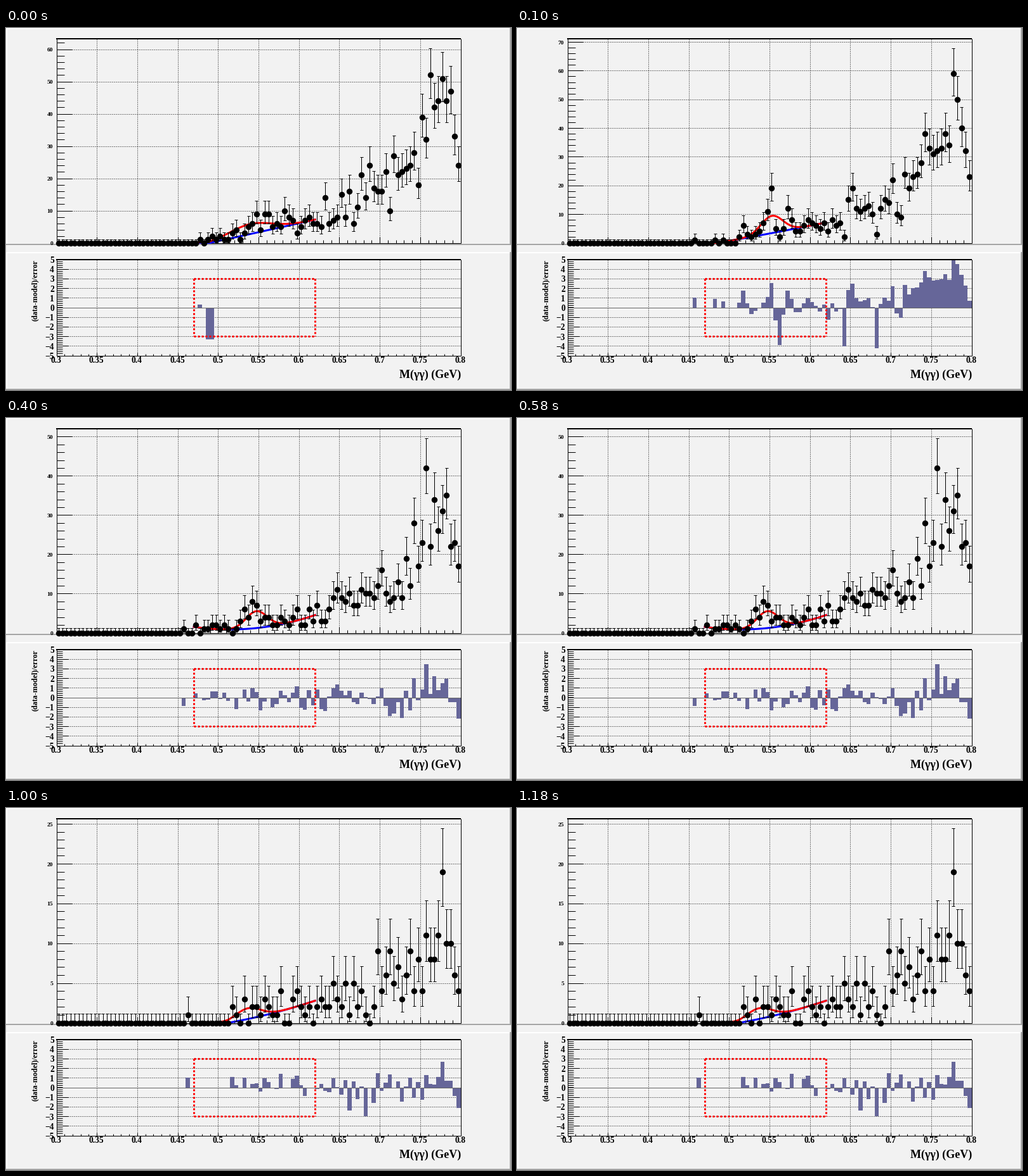
Animation of 796 by 572 pixels, one loop 1300 ms. Source, as a matplotlib script:

```python
import numpy as np
import matplotlib.pyplot as plt
from matplotlib.animation import FuncAnimation
from matplotlib.collections import LineCollection
from matplotlib.patches import Rectangle

W, H = 796, 572
PT = 0.72                       # points per pixel at 100 dpi
LEFT, RIGHT = 79.5, 716.5
TOP, BASE = 17, 339.5           # spectrum frame
PTOP, PBASE = 365.5, 517.5      # pull frame
ZERO = (PTOP + PBASE) / 2
UNIT = (PBASE - PTOP) / 10
BINS = 100
BW = (RIGHT - LEFT) / BINS
CENTERS = LEFT + BW * (np.arange(BINS) + 0.5)
FIT = (0.47, 0.62)
BG, BAR = "#f2f2f2", "#666699"

fig = plt.figure(figsize=(W / 100, H / 100), dpi=100, facecolor=BG)
ax = fig.add_axes([0, 0, 1, 1])
ax.set_xlim(0, W)
ax.set_ylim(H, 0)
ax.axis("off")


def px(mass):
    return LEFT + (np.asarray(mass) - 0.3) / 0.5 * (RIGHT - LEFT)


def segments(segs, color="black", width=1, style="solid", z=2):
    return ax.add_collection(LineCollection(
        segs, colors=color, linewidths=width * PT, linestyles=[style],
        zorder=z, capstyle="butt"))


def hline(y, x0=LEFT, x1=RIGHT):
    return [(x0, y), (x1, y)]


def vline(x, y0, y1):
    return [(x, y0), (x, y1)]


def grid(segs):
    return segments(segs, style=(0, (1, 2)), z=1)


def label(x, y, s, size, **kw):
    kw = {"ha": "right", "va": "center_baseline", **kw}
    return ax.text(x, y, s, fontsize=size * PT, family=["Liberation Serif", "DejaVu Serif"],
                   weight="bold", zorder=9, **kw)


def bevel(y0, y1):
    for x, y, w, h, c in [(0, y0, W, 2, "white"), (0, y0, 2, y1 - y0, "white"),
                          (0, y1 - 2, W, 2, "#a6a6a6"),
                          (W - 2, y0, 2, y1 - y0, "#a6a6a6")]:
        ax.add_patch(Rectangle((x, y), w, h, fc=c, lw=0, zorder=0.5))


def frame(y0, y1):
    segments([hline(y1), vline(LEFT, y0, y1), vline(RIGHT, y0, y1)], z=4)
    segments([hline(y0, LEFT - 0.5, RIGHT + 0.5)], width=2, z=4)
    major = px(np.arange(0.35, 0.79, 0.05))
    grid([vline(x, y1, y0) for x in major])
    tick = 0.03 * (y1 - y0)
    segments([vline(x, y1, y1 - tick) for x in major])
    segments([vline(x, y1, y1 - tick / 2) for x in px(np.arange(0.31, 0.795, 0.01))])


def draw_static():
    bevel(0, 343)
    bevel(354, H)
    frame(TOP, BASE)
    frame(PTOP, PBASE)
    levels = range(-5, 6)
    ys = [ZERO - v * UNIT for v in levels]
    grid([hline(y) for y in ys[1:-1]])
    segments([hline(y, LEFT, LEFT + 18) for y in ys])
    segments([hline(ZERO - v * UNIT, LEFT, LEFT + 9) for v in np.arange(-5, 5.1, 0.2)])
    for v, y in zip(levels, ys):
        label(76, y + 0.5, str(v).replace("-", "\u2212"), 13.5)
    for m in np.arange(0.3, 0.81, 0.05):
        label(px(m) - 0.5, 529, f"{m:.2f}".rstrip("0"), 13.5, ha="center", va="baseline")
    label(717, 553, "M(\u03b3\u03b3) (GeV)", 18, va="baseline")
    label(52, 366, "(data-model)/error", 12, rotation=90, va="top",
          rotation_mode="default")
    segments([hline(ZERO)], color="#666666", z=3.5)
    x0, x1 = px(FIT)
    y0, y1 = ZERO - 3 * UNIT, ZERO + 3 * UNIT
    segments([hline(y0, x0, x1), hline(y1, x0, x1), vline(x0, y0, y1), vline(x1, y0, y1)],
             color="red", width=3, style=(0, (1, 1)), z=5)


def poisson_errors(n):
    """Central 68% interval (Wilson-Hilferty); one-sided for empty bins."""
    m, k = np.maximum(n, 1), n + 1
    low = np.where(n > 0, n - m * (1 - 1 / (9 * m) - 1 / (3 * np.sqrt(m))) ** 3, 0)
    high = k * (1 - 1 / (9 * k) + 1 / (3 * np.sqrt(k))) ** 3 - n
    return low, np.where(n > 0, high, 1.148)


def pulls(n, knots):
    """Pull of each filled bin against a curve through (bin, value) knots."""
    expected = np.interp(np.arange(BINS), *zip(*knots))
    return np.where(n > 0, (n - expected) / np.sqrt(np.maximum(n, 1)), 0)


def spectrum(tail, step, back, peak, knots=None, fixed=None):
    """Build one fit result and return its artists."""
    n = np.array([0] * (BINS - len(tail)) + tail, float)
    low, high = poisson_errors(n)
    ymax = 1.05 * (n + high).max()

    def py(v):
        return BASE - v / ymax * (BASE - TOP)

    majors = np.arange(0, ymax, step)
    out = [grid([hline(py(v)) for v in majors[1:]]),
           segments([hline(py(v), LEFT, LEFT + 24) for v in majors]),
           segments([hline(py(v), LEFT, LEFT + 12) for v in np.arange(0, ymax, step / 5)])]
    out += [label(74, py(v) + 0.5, f"{v:.0f}", 9.5) for v in majors]

    m = np.linspace(*FIT, 120)
    b = np.maximum(np.polyval(np.polyfit(*zip(*back), 2), m), 0)
    amp, mean, sigma = peak
    s = b + amp * np.exp(-0.5 * ((m - mean) / sigma) ** 2)
    for curve, color, z in ((b, "blue", 5), (s, "red", 5.1)):
        out += ax.plot(px(m), py(curve), color=color, lw=3 * PT, zorder=z)

    y, y0, y1 = py(n), py(n - low), py(n + high)
    bars = [vline(x, a, c) for x, a, c in zip(CENTERS, y0, y1)]
    bars += [hline(c, x - 2.5, x + 2.5) for x, c in zip(CENTERS, y1)]
    bars += [hline(a, x - 2.5, x + 2.5) for x, a, k in zip(CENTERS, y0, n) if k]
    out.append(segments(bars, z=6))
    out += ax.plot(CENTERS, y, "o", color="black", ms=9.4 * PT, mew=0, zorder=7)

    r = np.zeros(BINS)
    if knots:
        r = pulls(n, knots)
    for i, v in (fixed or {}).items():
        r[i] = v
    r = np.clip(r, -5, 5)
    out.append(ax.bar(CENTERS, -r * UNIT, BW, bottom=ZERO, color=BAR, lw=0,
                      zorder=3, antialiased=False))
    return out


draw_static()

first = spectrum(
    [1, 0, 1, 2, 1, 2, 1, 1, 3, 4, 1, 3, 5, 6, 9, 4, 9, 9, 5, 6,
     5, 10, 8, 7, 3, 5, 7, 8, 6, 6, 5, 14, 6, 7, 8, 15, 8, 16, 6, 11,
     21, 14, 24, 17, 16, 16, 22, 10, 27, 21, 22, 23, 24, 28, 18, 39, 32, 52, 42, 44,
     51, 44, 47, 33, 24],
    10, [(0.49, 0), (0.51, 1.1), (0.55, 3.3), (0.62, 7.2)], (3.1, 0.54, 0.0255),
    fixed={35: 0.3, 37: -3.3, 38: -3.3})

second = spectrum(
    [1, 0, 0, 0, 0, 1, 0, 1, 0, 0, 0, 2, 6, 3, 2, 3, 4, 7, 11, 19, 5, 2, 5, 12,
     8, 4, 4, 6, 8, 7, 6, 5, 7, 4, 8, 6, 7, 2, 15, 19, 12, 11, 12, 13,
     10, 3, 12, 15, 14, 22, 10, 9, 24, 19, 23, 24, 28, 38, 33, 31, 32, 33, 38, 34,
     59, 50, 40, 32, 23],
    10, [(0.49, 0.2), (0.5225, 1.8), (0.5525, 3.4), (0.5825, 5), (0.62, 7.1)],
    (6, 0.553, 0.0135),
    [(35, 0), (36, 0.1), (38, 0.4), (42, 1.3), (43, 1.7), (44, 2.3), (45, 3), (47, 4.2),
     (48, 5.7), (49, 7.35), (50, 8.1), (51, 8), (52, 7.5), (54, 5.9), (56, 5), (58, 5),
     (62, 5.9), (68, 7.7), (76, 10.3), (82, 12.3), (88, 14.7), (93, 16.7), (99, 19.6)])

third = spectrum(
    [1, 0, 0, 2, 0, 1, 1, 2, 2, 1, 2, 1, 0, 1, 3, 6, 4, 8, 7, 3, 4, 4, 2, 2,
     4, 3, 2, 4, 6, 2, 2, 6, 3, 7, 3, 3, 6, 9, 11, 9, 8, 10, 7, 7,
     11, 10, 10, 9, 12, 16, 10, 8, 9, 13, 9, 19, 12, 28, 17, 23, 42, 22, 34, 26,
     31, 35, 22, 23, 17],
    10, [(0.47, 1.5), (0.49, 1.1), (0.52, 0.9), (0.5475, 1.25), (0.5775, 2.15),
         (0.6, 3.2), (0.62, 4.6)], (4.3, 0.5475, 0.0131),
    [(31, 1.9), (34, 1.43), (37, 1.2), (39, 1.08), (42, 1.35), (44, 2.2), (45, 3.1),
     (47, 4.8), (48, 5.3), (49, 5.6), (50, 5.3), (51, 4.8), (53, 3.4), (55, 2.6),
     (57, 2.7), (60, 3.5), (64, 4.75), (69, 6.5), (75, 9.3), (81, 12.8), (87, 16.6),
     (93, 21.2), (99, 26.1)])

fourth = spectrum(
    [2, 1, 0, 1, 1, 1, 0, 4, 2, 2, 4, 6, 5, 2, 7, 3, 2, 3,
     1, 5, 0, 4, 3, 2, 0, 2, 2, 1, 7, 7, 5, 6, 3, 4, 5, 7, 6, 7,
     4, 7, 6, 6, 9, 6, 10, 13, 4, 6, 15, 6, 11, 20, 9, 18, 15, 15, 23, 22,
     26, 20, 23, 11, 11],
    5, [(0.4825, 0.25), (0.515, 0.95), (0.5475, 1.45), (0.5875, 1.95), (0.62, 2.25)],
    (3.45, 0.548, 0.0162),
    [(37, 0.3), (40, 0.55), (42, 0.75), (44, 1.3), (45, 1.6), (46, 2.1), (48, 2.95),
     (49, 3.2), (50, 3.1), (52, 2.5), (54, 1.8), (56, 1.4), (58, 1.3), (64, 1.5),
     (72, 1.84), (85, 2), (99, 2.1)])

fifth = spectrum(
    [1] + [0] * 10 + [2, 1, 0, 3, 0, 2, 2, 1, 3, 2, 1, 1,
     4, 0, 0, 3, 4, 2, 1, 2, 0, 2, 3, 2, 2, 5, 3, 2, 5, 1, 5, 2,
     4, 1, 0, 2, 9, 4, 6, 9, 5, 7, 3, 6, 9, 4, 8, 4, 11, 8, 8, 11,
     19, 10, 10, 6, 4],
    5, [(0.513, 0), (0.5325, 0.4), (0.5575, 1), (0.575, 1.4), (0.59, 1.8),
        (0.605, 2.3), (0.62, 2.8)], (1.35, 0.537, 0.0155),
    [(41, 0), (43, 0.45), (44, 0.75), (46, 1.27), (48, 1.45), (50, 1.4), (53, 1.13),
     (55, 1.2), (58, 1.44), (62, 2), (70, 3.1), (78, 4.3), (86, 5.75), (99, 8.3)])

scenes = [first, second, third, fourth, fifth]


def update(k):
    current = (k + 2) // 3      # 100 ms opening, then 300 ms each
    for i, scene in enumerate(scenes):
        for artist in scene:
            for part in (artist if isinstance(artist, tuple) else [artist]):
                part.set_visible(i == current)
    return []


anim = FuncAnimation(fig, update, frames=13, interval=100, repeat=True, repeat_delay=0)
plt.show()
```
